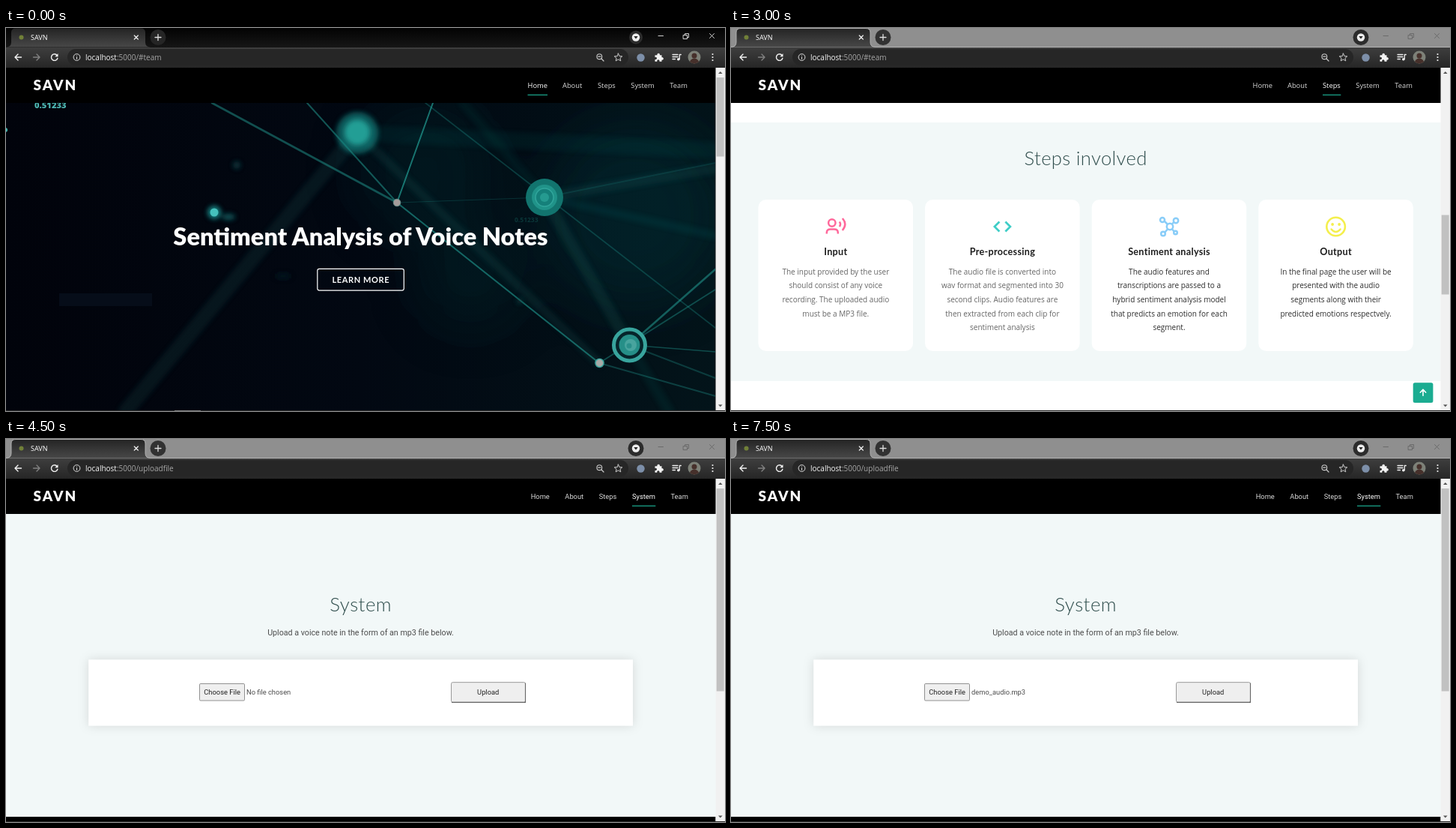
Recreate the animation shown at these times as an HTML page. Size 960x511 px, loop 8 s.

```html
<!DOCTYPE html>
<html lang="en">
<head>
<meta charset="utf-8">
<title>SAVN</title>
<style>
html, body { margin: 0; width: 100%; height: 100%; overflow: hidden; background: #000; }
svg { display: block; width: 960px; height: 511px; }
.sans { font-family: "Open Sans", sans-serif; }
.robo { font-family: Roboto, sans-serif; }
.lato { font-family: Lato, sans-serif; }
.line { fill: none; stroke-linecap: round; stroke-linejoin: round; }
.about { font: 10.76px/16px "Open Sans", sans-serif; color: #4c4c4c; }
.about div { text-align: justify; text-align-last: justify; white-space: nowrap; }
.about div:last-child { text-align-last: left; }
</style>
</head>
<body>
<svg id="stage" viewBox="0 0 960 511" xmlns="http://www.w3.org/2000/svg"></svg>
<script>
const LOOP = 8000, TEAL = '#1bac91';

// Drawing helpers
const text = (x, y, s, size, fill, more = '', font = 'sans') =>
  `<text x="${x}" y="${y}" font-size="${size}" fill="${fill}" class="${font}" ${more}>${s}</text>`;
const mid = 'text-anchor="middle"';
const rect = (x, y, w, h, fill, more = '') =>
  `<rect x="${x}" y="${y}" width="${w}" height="${h}" fill="${fill}" ${more}/>`;
const dot = (x, y, r, fill, more = '') => `<circle cx="${x}" cy="${y}" r="${r}" fill="${fill}" ${more}/>`;
const line = (d, stroke, w = 1, more = '') =>
  `<path class="line" d="${d}" stroke="${stroke}" stroke-width="${w}" ${more}/>`;
const fill = (d, c, more = '') => `<path d="${d}" fill="${c}" ${more}/>`;
const group = (id, s) => `<g id="${id}">${s}</g>`;

const grad = (id, dir, ...stops) => `<linearGradient id="${id}" x2="${dir === 'h' ? 1 : 0}" y2="${dir === 'h' ? 0 : 1}">` +
  stops.map((c, i) => `<stop offset="${i / (stops.length - 1)}" stop-color="${c}"/>`).join('') + '</linearGradient>';
const blur = (id, n) => `<filter id="${id}" filterUnits="userSpaceOnUse" x="0" y="0" width="960" height="560"><feGaussianBlur stdDeviation="${n}"/></filter>`;

const defs = `<defs>
  ${grad('dark', 'v', '#030303', '#161616')}${grad('tab', 'v', '#242424', '#484848')}
  ${grad('bar', 'v', '#3e3e3e', '#262626')}${grad('sky', 'h', '#01030b', '#020812', '#03141a')}
  ${blur('b1', .7)}${blur('b3', 3)}${blur('b30', 35)}
  <clipPath id="page"><rect y="100" width="947" height="410"/></clipPath>
  <clipPath id="face"><circle cx="919" cy="39" r="8.5"/></clipPath>
  <clipPath id="side"><rect x="405" y="203" width="29" height="208"/></clipPath>
  <clipPath id="cols"><rect x="448" y="203" width="425" height="22"/></clipPath>
  <filter id="shade" x="-10%" y="-30%" width="120%" height="160%"><feDropShadow dx="0" dy="0" stdDeviation="7" flood-opacity=".13"/></filter>
</defs>`;

// Browser frame
function titleBar(active) {
  const c = active ? '#e8e8e8' : '#666';
  const edge = 'M0 25.5Q7 25.5 7 19V6Q7 .5 13 .5H180Q186 .5 186 6V19Q186 25.5 193 25.5';
  return rect(0, 0, 960, 26, active ? 'url(#dark)' : '#8f8f8f') +
    fill(edge + 'Z', 'url(#tab)') +
    (active ? '' : line(edge + 'H960', '#b8b8b8', .9)) +
    dot(20.5, 12.5, 3, '#718038') +
    text(33, 15.7, 'SAVN', 9, '#fff') +
    line('M171.3 10l5 5m0 -5l-5 5', '#eee', 1.3) +
    dot(203, 12.5, 10.5, active ? '#252525' : '#323232') +
    line('M199 12.5h8m-4 -4v8', '#ddd', 1.3) +
    dot(841, 12.5, active ? 9 : 10.5, '#2c2c2c') + dot(841, 12.5, 5.2, '#eee') +
    fill('M838.3 11h5.4l-2.7 3.6z', '#222') +
    line('M871 10.5h6.5M904.5 9.5h5v5h-5zM906.5 9.3V7.5h5v5h-1.8M939.5 7.5l6 6m0 -6l-6 6', c, .9);
}

const toolbar = rect(0, 26, 960, 27, 'url(#bar)') +
  rect(82, 28, 749, 22, '#262626', 'rx="11"') +
  line('M20.5 39H12m4 -4l-4 4l4 4', '#f2f2f2', 1.4) +
  line('M36.5 39H45m-4 -4l4 4l-4 4', '#818181', 1.4) +
  line('M68.2 36.5A4.3 4.3 0 1 0 68.9 40.3', '#f2f2f2', 1.4) + fill('M69.5 34v4.2h-4.2z', '#f2f2f2') +
  dot(94.5, 39, 4.4, 'none', 'stroke="#ddd"') + line('M94.5 38.7v2.5M94.5 36.7v.1', '#ddd', 1.1) +
  dot(792.3, 38.2, 3.4, 'none', 'stroke="#ccc" stroke-width="1.1"') + line('M795 41l3 3M790.7 38.2h3.2', '#ccc', 1.2) +
  line('M817.5 34l1.5 3.5l3.8 .3l-2.9 2.4l.9 3.7l-3.3 -2l-3.3 2l.9 -3.7l-2.9 -2.4l3.8 -.3z', '#ccc') +
  dot(847.5, 39.5, 5.2, '#7d8fa9') +
  fill('M866.5 36.2h3a1.8 1.8 0 1 1 3.4 0h2.6v3a1.8 1.8 0 1 1 0 3.4v2.2h-3.1a1.7 1.7 0 1 0 -3 0h-2.9v-2.9a1.7 1.7 0 1 0 0 -3z', '#f4f4f4') +
  line('M890 35.5h7M890 38.5h7M890 41.5h3.5M899.3 41.5V35.5h2', '#eee', 1.3) + dot(897.8, 41.7, 1.8, '#eee') +
  `<g clip-path="url(#face)">${rect(910, 30, 18, 18, '#7d8178')}${dot(919, 37, 3.5, '#46302b')}${dot(919, 47, 6.5, '#46302b')}</g>` +
  [35, 39, 43].map(y => dot(943.5, y, 1.1, '#eee')).join('');

const url = path => text(106, 42.8, `localhost<tspan fill="#a6a6a6">:5000/${path}</tspan>`, 10, '#f5f5f5');

function scrollBar(y, h) {
  return rect(947.5, 53, 12.5, 457, '#f1f1f1') + rect(948.7, y, 10, h, '#c1c1c1') +
    fill('M951 61h5.6l-2.8 -3z', '#555') + fill('M951 502.5h5.6l-2.8 3z', '#555');
}

function menu(active, xs, widths, font) {
  return rect(0, 53, 947.5, 47, '#000') +
    text(36.5, 83.3, 'SAVN', 19, '#fff', 'font-weight="900" letter-spacing="2"', 'lato') +
    ['Home', 'About', 'Steps', 'System', 'Team'].map((s, i) =>
      text(xs[i], 80, s, 9.33, i === active ? '#fff' : '#d8d8d8', '', font)).join('') +
    rect(xs[active], 88.7, widths[active], 1.2, TEAL);
}
const mainMenu = i => menu(i, [696.5, 743, 790, 834.3, 886.3], [26.5, 27, 24.3, 32, 25], 'sans');
const upButton = rect(910.7, 473.3, 26.7, 26.7, TEAL, 'rx="2.5"') +
  line('M924 490.5v-8m-3.7 3.7l3.7 -3.8l3.7 3.8', '#fff', 1.6);

// Hero picture: x1, y1, x2, y2, width, opacity
const wide = [
  [469, 140, 160, 511, 20, .1], [469, 140, 792, 447, 12, .1], [469, 140, 947, 163, 22, .07],
  [719, 226, 947, 187, 14, .1], [719, 226, 947, 277, 10, .09], [719, 226, 832, 423, 16, .11],
  [832, 423, 885, 511, 14, .08], [719, 226, 610, 100, 12, .06]];
const thin = [
  [275, 100, 522, 233, 2.6, .45], [402, 100, 522, 233, 2, .48], [570, 100, 522, 233, 2, .65],
  [522, 233, 719, 226, 1.2, .22], [522, 233, 792, 447, 2.2, .55], [560, 100, 947, 400, 1.7, .28],
  [947, 322, 832, 423, 2.6, .5], [947, 349, 792, 447, 2, .38], [832, 423, 947, 432, 1.5, .38],
  [832, 423, 947, 467, 2.2, .27], [792, 447, 947, 491, 2, .3], [719, 226, 947, 180, 2, .15]];
const beams = list => list.map(([a, b, c, d, w, o]) => line(`M${a} ${b}L${c} ${d}`, '#26a99e', w, `opacity="${o}"`)).join('');

const hero = `<g clip-path="url(#page)">` + rect(0, 100, 948, 411, 'url(#sky)') +
  `<g filter="url(#b30)">${dot(840, 250, 120, '#0b4248', 'opacity=".28"')}${dot(560, 190, 90, '#0b4248', 'opacity=".2"')}${dot(620, 330, 70, '#0b4248', 'opacity=".2"')}</g>` +
  `<g filter="url(#b3)">${beams(wide)}</g><g filter="url(#b1)">${beams(thin)}</g>` +
  `<g filter="url(#b3)">${dot(469, 140, 28, '#168580', 'opacity=".65"')}${dot(469, 139, 17, '#229e95')}
    ${dot(278, 246, 9, '#1c9d9b', 'opacity=".8"')}${dot(308, 183, 5, '#0b4a50', 'opacity=".7"')}<ellipse cx="297" cy="252" rx="9" ry="4" fill="#0d5558"/>
    ${dot(686, 364, 4, '#0b474a', 'opacity=".6"')}<ellipse cx="370" cy="331" rx="11" ry="4" fill="#061f28" opacity=".6"/></g>` +
  `<g filter="url(#b1)">${dot(719, 226, 25, '#12746e')}${dot(719, 226, 17, '#209389')}${dot(719, 226, 12, '#15807a', 'stroke="#31a69c" stroke-width="1.5"')}${dot(719, 226, 6, '#259a90')}
    ${dot(832.5, 423, 21, '#06252b', 'stroke="#38a49d" stroke-width="5"')}${dot(832.5, 423, 14, '#268f88')}${dot(834, 423, 8, '#48a49e')}${dot(832, 424, 3.5, '#2a908b')}
    ${dot(278, 246, 5.5, '#45c2bd')}${dot(522, 233, 4.8, '#a59b9a', 'stroke="#6a8f8c"')}${dot(792.5, 447, 5.5, '#a7aaa7', 'stroke="#3da69f" stroke-width="1.5"')}
    ${text(38, 107, '0.51233', 11.2, '#4db6b1', 'font-weight="800"')}${text(679, 259, '0.51233', 8.5, '#0a3638', 'font-weight="700"')}
    ${dot(-1, 136, 3, '#45bab3')}${rect(71, 354, 124, 17, '#060d19')}</g></g>` +
  text(473.5, 290, 'Sentiment Analysis of Voice Notes', 32.6, '#fff', `${mid} font-weight="900"`, 'lato') +
  rect(415.8, 321.3, 115.5, 28.8, 'none', 'rx="2.5" stroke="#fff" stroke-width="1.2"') +
  text(473.8, 339.6, 'LEARN MORE', 11, '#fff', `${mid} font-weight="700" letter-spacing=".6"`, 'lato');

// About page
const about = `Sentiment analysis is the interpretation and classification of emotions (positive,
negative and neutral) within data using several analysis techniques. Sentiment
analysis and opinion mining have been acquiring a crucial role in both commercial
and research applications because of their possible applicability to several different
fields. For example in business : social media monitoring, customer support, brand
monitoring, analysis of a customer’s voice, market research and competitive
research, etc. Although sentiment analysis has evolved over the past few decades,
most of the work in it revolved around textual sentiment analysis with text mining
techniques. Nevertheless, sentiment analysis on Audio data is also an extremely
important field, as sentiment analysis on audio can be used to classify many different
interactions between businesses and their customers/users. For example: Audio
sentiment analysis can be used to classify the different types of calls that customer
service centers receive for further analysis. It can also be used to classify other data
such as audiobooks, podcasts, etc. Our software system aims to make sentiment
analysis on audio files available to the wider public by having it hosted on a cloud
platform. This method of deployment eliminates the need for an individual use to
possess the necessary resources required to perform the analysis.`;

const butt = 'style="stroke-linecap:butt;stroke-linejoin:miter"';
const mic = line('M84 240V249C84 285 105 309 136 309S188 285 188 249V240', '#000', 5.5, butt) +
  line('M81 240.5H108M165 240.5H191', '#000', 5.5, butt) +
  rect(127, 312, 18, 26, '#ffc07d') + rect(138, 312, 7, 26, '#eba763') +
  line('M127 309V337M146 309V337', '#000', 5, butt) +
  rect(98, 338, 76, 17, '#969696', 'stroke="#000" stroke-width="5"') + line('M116 347H156', '#000', 4, butt) +
  fill('M107 242V192A29.5 31 0 0 1 166 192V242Z', '#969696') +
  fill('M107 242H166V262A29.5 29 0 0 1 107 262Z', '#ffc07d') + fill('M151 242H166V262A29 29 0 0 1 140 290Q151 280 151 262Z', '#eba763') +
  line('M107 192A29.5 31 0 0 1 155 167M163 176Q166 183 166 192V262A29.5 29 0 0 1 107 262V192', '#000', 5.5, butt) +
  line('M104 242H169M107 193h18M107 209h18M107 225h18M148 193h18M148 209h18M148 225h18', '#000', 5, butt) +
  [193, 209, 225].map(y => rect(145, y - 3, 6, 6, '#fff')).join('') + rect(133.5, 173, 5.5, 6, '#fff') +
  dot(136.5, 267, 9, '#ef5f78', 'stroke="#000" stroke-width="5"') + rect(151, 249, 6, 6, '#000') + rect(115, 279, 6, 5, '#000');

const moods = [['#35b911', 7], ['#eee64b', 6], ['#20a9df', -6], ['#e31b23', -6]];
const faces = moods.map(([c, bend], i) => {
  const x = 212.7 + i * 42, y = 227, my = bend > 0 ? 232 : 237.5;
  const brows = `M${x - 9} 219l6 3.5M${x + 9} 219l-6 3.5`;
  const mouth = `M${x - 8} ${my}Q${x} ${my + bend * 1.6} ${x + 8} ${my}`;
  const outlined = d => line(d, '#111', 3.4) + line(d, c, 2);
  const eye = ex => dot(ex, 223.5, 2.3, c, 'stroke="#111" stroke-width=".9"');
  return dot(x, y, 16.3, '#fff', 'stroke="#111" stroke-width="4.6"') + dot(x, y, 16.3, 'none', `stroke="${c}" stroke-width="3"`) +
    (i === 3 ? outlined(brows) : '') + eye(x - 5.5) + eye(x + 5.5) + outlined(mouth);
}).join('');

const tone = { g: '#38b90c', l: '#8cdd12', y: '#fff94f', o: '#dfdc48', b: '#159fd7', p: '#8944ae', r: '#e41717' };
const wave = [4, 8, 12, 19.5, 12, 27, 43, 27, 15.5, 12, 7.5, 16, 9.5, 4].map((h, i) =>
  rect(194 + i * 11.75, 296 - h, 7.6, h * 2, tone['ggglyoobbbprrr'[i]], 'stroke="#333" stroke-width=".7"')).join('');

const aboutPage = rect(0, 100, 948, 411, '#fff') + mic + faces + wave +
  text(482, 162, 'About the system', 24.6, '#2f4d4c', 'font-weight="300" letter-spacing=".35"', 'lato') +
  `<foreignObject x="482" y="190" width="429" height="280"><div xmlns="http://www.w3.org/1999/xhtml" class="about">${about.split('\n').map(s => `<div>${s}</div>`).join('')}</div></foreignObject>` + upButton;

// Steps page
const smile = c => dot(0, 0, 12.3, 'none', `stroke="${c}" stroke-width="2.6"`) + dot(-4.5, -3, 1.9, c) + dot(4.5, -3, 1.9, c) +
  line('M-6 3.5Q0 10.5 6 3.5', c, 2.5);
const ring = (x, y, r) => dot(x, y, r, '#fff', 'stroke="#89cdf8" stroke-width="2.5"');
const cards = [
  ['Input', '#666', ['The input provided by the user', 'should consist of any voice', 'recording. The uploaded audio', 'must be a MP3 file.'],
    dot(-5, -5, 4.7, 'none', 'stroke="#ff689b" stroke-width="2.5"') +
    line('M-12 9.5V8Q-12 3.5 -7 3.5H-2Q3 3.5 3 8V9.5M5 -6.5Q7.5 -3.5 5 0M9 -11Q16 -3.5 9 5', '#ff689b', 2.5, butt)],
  ['Pre-processing', '#666', ['The audio file is converted into', 'wav format and segmented into 30', 'second clips. Audio features are', 'then extracted from each clip for', 'sentiment analysis'],
    line('M-4 -6.5L-10.5 0L-4 6.5M4 -6.5L10.5 0L4 6.5', '#3fcdc7', 2.7, butt)],
  ['Sentiment analysis', '#2d2d2d', ['The audio features and', 'transcriptions are passed to a', 'hybrid sentiment analysis model', 'that predicts an emotion for each', 'segment.'],
    line('M-8 -9L1 0L8 -8M1 0L-7 9M1 0L8 8', '#89cdf8', 2.5) + ring(1, 0, 4.2) + ring(-9, -9, 3) + ring(9, -8, 3.2) + ring(-8, 9.5, 2.8) + ring(8.5, 8, 2.3)],
  ['Output', '#2d2d2d', ['In the final page the user will be', 'presented with the audio', 'segments along with their', 'predicted emotions respectvely.'], smile('#f4ef4d')]];

const stepsPage = rect(0, 100, 948, 411, '#fff') + rect(0, 126, 947.5, 345, '#f2f8f8') +
  text(473.6, 183, 'Steps involved', 25.6, '#2f4d4c', `${mid} font-weight="300" letter-spacing=".35"`, 'lato') +
  cards.map(([head, c, rows, icon], i) => {
    const x = 36.5 + i * 222.6, cx = x + 103.3;
    return rect(x, 229, 206.5, 202, '#fff', 'rx="10"') + `<g transform="translate(${cx} 265)">${icon}</g>` +
      text(cx, 303, head, 12.6, '#1d1d1d', `${mid} font-weight="700" letter-spacing=".3"`, 'lato') +
      rows.map((s, j) => text(cx, 328.8 + j * 18.6, s, 10, c, mid)).join('');
  }).join('') + upButton;

// Upload page
const uploadPage = rect(0, 100, 948, 411, '#f2f8f8') + rect(0, 504, 947.5, 7, '#000') +
  text(473.7, 230.3, 'System', 25.8, '#2f4d4c', `${mid} font-weight="300" letter-spacing=".5"`, 'lato') +
  text(473.5, 262.3, 'Upload a voice note in the form of an mp3 file below.', 10.7, '#4c4c4c', mid, 'robo') +
  rect(110.3, 294.5, 726.7, 88, '#fff', 'filter="url(#shade)"') +
  rect(258.5, 326.5, 60, 22.5, '#efefef', 'id="choose" rx="1.3" stroke="#777" stroke-width=".8"') +
  text(288.6, 341, 'Choose File', 9.33, '#222', mid, 'robo') +
  text(321, 341, '', 9.33, '#4c4c4c', 'id="chosen"', 'robo') +
  rect(594.5, 324.7, 99, 26.6, '#efefef', 'rx="2" stroke="#999" stroke-width="1"') +
  line('M595.5 351.4H693.5V326', '#666', 1.1) +
  text(643.7, 341, 'Upload', 9.33, '#222', mid, 'robo');

// File dialog
const W = '#eee', G = '#9a9a9a';
const folder = (x, y) => fill(`M${x} ${y}h4l1.3 1.5h6v7.5h-11.3z`, '#f5c64c') + rect(x, y + 3, 11.3, 6, '#ffdc78');
const button = (x, w, s) => rect(x, 446, w, 19, '#333', 'stroke="#ddd" stroke-width="1"') + text(x + w / 2, 459, s, 9, W, mid);
const dialog = rect(402, 120, 474, 358, '#000', 'opacity=".3" filter="url(#b3)"') +
  rect(404, 120, 470, 354, '#202020') + rect(404, 120, 470, 22, '#2b2b2b') + rect(404, 142, 470, 38, '#191919') +
  rect(404, 411, 470, 63, '#383838') +
  dot(416, 130.7, 5.5, '#db4437') + text(424.5, 134.5, 'Open', 9, G) + line('M857.5 127l7 7m0 -7l-7 7', '#aaa', .9) +
  line('M425 160.5h-8.5m4 -4l-4 4l4 4', W, 1.3) + line('M442.5 160.5h8.5m-4 -4l4 4l-4 4', '#999', 1.3) +
  line('M466.8 159l2.8 2.8l2.8 -2.8', W, 1.2) + line('M492.7 165v-8.5m-4 4l4 -4l4 4', W, 1.3) +
  rect(508.5, 147, 201, 26, 'none', 'stroke="#555" stroke-width=".9"') + folder(514.5, 155.5) + text(531, 163, '«', 8, '#888') +
  text(541, 163.7, 'Down...', 9, W) + line('M577 158l2.5 2.5l-2.5 2.5', W, 1.1) + text(586.3, 163.7, 'voicenote', 9, W) +
  line('M664 158.8l3.6 3.6l3.6 -3.6', W) + line('M698.3 158A4.1 4.1 0 1 0 699 161.5M698.8 155.5v2.8h-2.8', W, 1.1) +
  rect(715.5, 147, 152, 26, 'none', 'stroke="#555" stroke-width=".9"') + dot(732, 158.8, 3.1, 'none', 'stroke="#888"') + line('M729.7 161.2l-3 3', '#888') +
  text(746, 163.7, 'Search voicenote', 9, '#858585') +
  text(418, 194, 'Organize', 9, W) + fill('M457 189.5h5l-2.5 2.8z', '#bbb') + text(484.5, 194, 'New folder', 9, W) +
  rect(784.5, 184.5, 12, 11.5, '#bbb') + line('M785.5 187.5h10M785.5 190.3h10M785.5 193.1h10', '#333', .8) + fill('M802.8 189.5h4.6l-2.3 2.8z', '#bbb') +
  rect(823.5, 186.5, 11, 8.5, '#eee') + rect(829.5, 187.5, 4, 6.5, '#1c8be0') +
  dot(856, 190.5, 5.8, '#0078d7') + text(856, 194, '?', 9, '#fff', `${mid} font-weight="700"`) +
  `<g clip-path="url(#side)">${rect(432.5, 211, 1, 11, '#aaa')}${rect(432, 259, 10, 11, '#1c9be8')}${[284, 308, 332, 356].map(y => folder(432, y)).join('')}${rect(404, 381, 30, 21, '#333')}${rect(426, 386, 10, 7, '#35bfef')}${rect(428, 394, 7, 1.5, '#35bfef')}</g>` +
  line('M413 388l3 3.3l-3 3.3', '#aaa', 1.1) +
  rect(434, 203, 12.5, 208, '#181818') + rect(434, 251, 12, 130, '#4d4d4d') +
  line('M437 213l3 -3l3 3M437 403.5l3 3l3 -3', '#999', 1.1) + rect(447, 203, 1.2, 208, '#151515') +
  `<g clip-path="url(#cols)">${[584.5, 618.5, 753.5, 855].map(x => rect(x, 204, .9, 20, '#555')).join('')}
   ${[[472, 'Name'], [589, '#'], [623, 'Title'], [758, 'Contributing artists'], [860, 'Album']].map(([x, s]) => text(x, 217.6, s, 8.8, '#ddd')).join('')}</g>` +
  line('M523 207.5l2.7 -2.7l2.7 2.7', '#888') + rect(460, 230, 414, 19, '#333') +
  rect(464.5, 234, 8.5, 11, '#f2f2f2') + dot(468.8, 239.7, 2.9, '#943644') + dot(468.8, 239.7, 1, '#fff') + text(478, 243, 'demo_audio', 9, W) +
  rect(448, 399, 426, 12, '#181818') + rect(462.5, 399, 319.5, 12, '#4d4d4d') +
  line('M457 402.5l-2.6 2.7l2.6 2.7M865.5 402.5l2.6 2.7l-2.6 2.7', '#aaa', 1.1) +
  text(537, 436.5, 'File name:', 9, W, 'text-anchor="end"') +
  rect(540.5, 425, 170, 16.5, '#383838', 'stroke="#888" stroke-width=".8"') + text(542.5, 436.7, 'demo_audio', 9, W) +
  rect(719.5, 425, 141, 16.5, '#333', 'stroke="#888" stroke-width=".8"') + text(721.5, 436.7, 'All Files', 9, W) +
  line('M700.5 432l2.7 2.7l2.7 -2.7M850.5 432l2.7 2.7l2.7 -2.7', '#bbb', .9) +
  button(719.5, 66, 'Open') + button(794.5, 66, 'Cancel') +
  [[871, 472], [868.5, 472], [871, 469.5], [866, 472], [871, 467]].map(([x, y]) => rect(x, y, 1.3, 1.3, '#aaa')).join('') +
  rect(404.4, 120.4, 469.2, 353.2, 'none', 'stroke="#555" stroke-width=".8"');

const stage = document.getElementById('stage');
stage.innerHTML = defs + group('hero', hero) + group('about', aboutPage) + group('steps', stepsPage) + group('upload', uploadPage) +
  group('menu', '') + group('scroll', '') + group('title', '') + toolbar + group('url', '') +
  rect(0, 510, 960, 1, '#282828') + rect(225, 510, 35, 1, '#777', 'id="glint"') + group('dialog', dialog);

const uploadMenu = menu(3, [700.7, 746.3, 791.7, 836, 887.5], [25.5, 25, 24, 31.3, 24], 'robo');
const scenes = [
  { at: 0, page: 'hero', menu: mainMenu(0), scroll: [66, 105.5] },
  { at: 1500, page: 'about', menu: mainMenu(1), scroll: [160, 106] },
  { at: 3000, page: 'steps', menu: mainMenu(2), scroll: [249.5, 106] },
  { at: 4500, page: 'upload', file: 'No file chosen' },
  { at: 6000, page: 'upload', file: 'No file chosen', dialog: true },
  { at: 7500, page: 'upload', file: 'demo_audio.mp3' }];

const $ = id => document.getElementById(id);
const show = (id, on) => { $(id).style.display = on ? '' : 'none'; };
let current = null;

function render(ms) {
  const scene = scenes.filter(s => s.at <= ms % LOOP).pop();
  if (scene === current) return;
  current = scene;
  const home = scene.page === 'hero', upload = scene.page === 'upload';
  for (const id of ['hero', 'about', 'steps', 'upload']) show(id, id === scene.page);
  show('dialog', scene.dialog);
  show('glint', home);
  $('title').innerHTML = titleBar(home);
  $('menu').innerHTML = scene.menu || uploadMenu;
  $('scroll').innerHTML = scrollBar(...(scene.scroll || [66, 270.5]));
  $('url').innerHTML = url(upload ? 'uploadfile' : '#team');
  $('chosen').textContent = scene.file || '';
  $('choose').setAttribute('fill', scene.dialog ? '#e3e3e3' : '#efefef');
  $('choose').setAttribute('stroke', scene.dialog ? '#444' : '#777');
}

const start = performance.now();
function tick() {
  render(performance.now() - start);
  requestAnimationFrame(tick);
}
tick();
</script>
</body>
</html>
```
